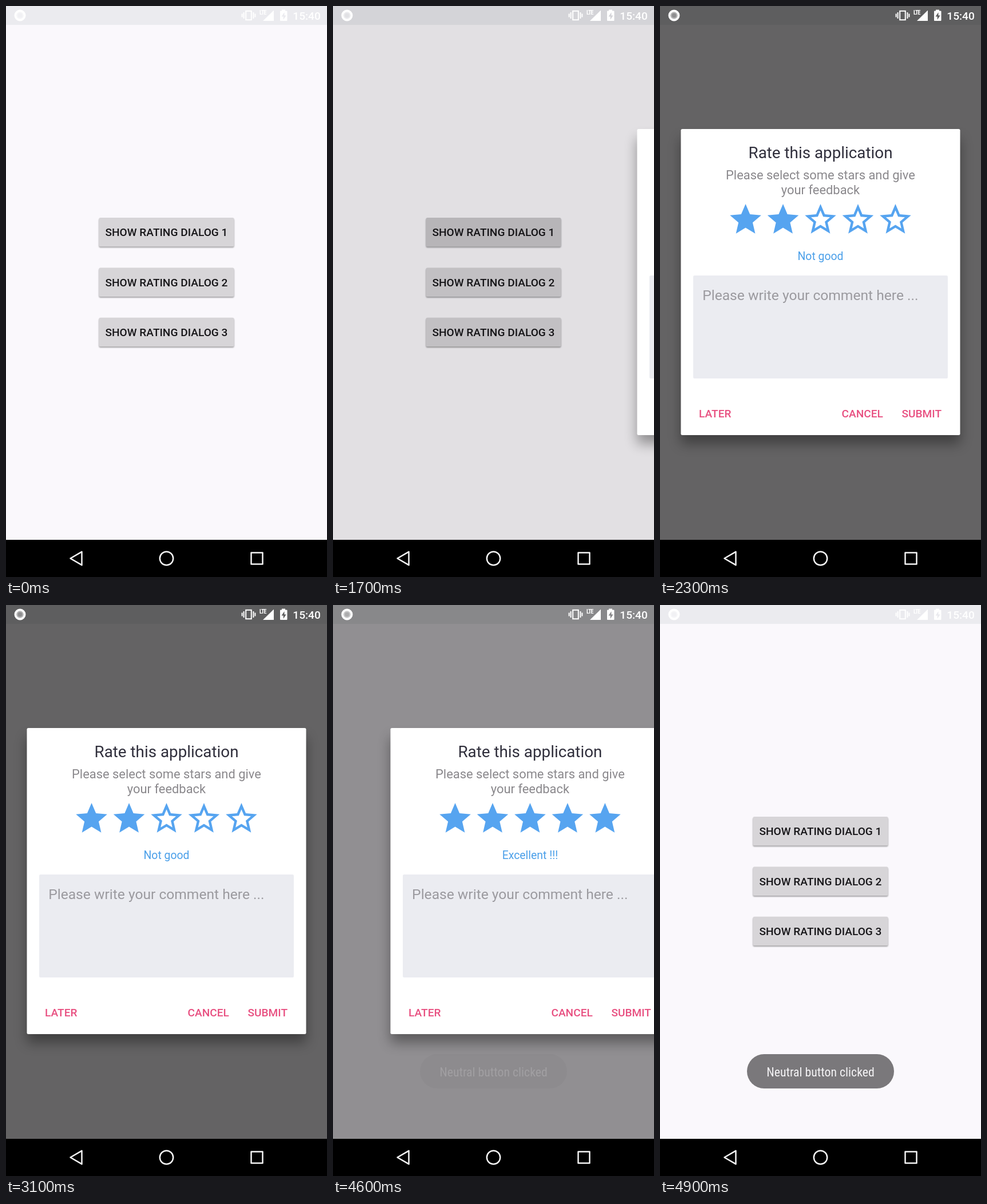
An HTML page that plays this animation: 561 by 998 pixels, repeating every 5 s.

```html
<!DOCTYPE html>
<html lang="en">
<head>
<meta charset="utf-8">
<title>Rating dialog</title>
<style>
  html, body { margin: 0; width: 100%; height: 100%; overflow: hidden; background: #faf8fc; }
  svg { display: block; width: 561px; height: 998px; }
  text { font-family: Roboto, "Open Sans", sans-serif; }
  .mid { text-anchor: middle; }
  .caps { font-size: 19.1px; font-weight: 500; }
  .soft { filter: blur(1.3px); }
  .deep { filter: blur(11px); }
  .condensed { font-family: "Roboto Condensed", Roboto, sans-serif; font-stretch: 75%; }
</style>
</head>
<body>
<svg viewBox="0 0 561 998" xmlns="http://www.w3.org/2000/svg">
  <defs>
    <path id="full" d="M12 17.27 18.18 21l-1.64-7.03L22 9.24l-7.19-.61L12 2 9.19 8.63 2 9.24l5.46 4.73L5.82 21z"/>
    <path id="empty" fill-rule="evenodd" d="M22 9.24l-7.19-.62L12 2 9.19 8.63 2 9.24l5.46 4.73L5.82 21 12 17.27 18.18 21l-1.63-7.03zM12 15.4l-3.76 2.27 1-4.28-3.32-2.88 4.38-.38L12 6.1l1.71 4.04 4.38.38-3.32 2.88 1 4.28z"/>
  </defs>

  <rect width="561" height="998" fill="#faf8fc"/>
  <rect width="561" height="33" fill="#ebebef"/>
  <g id="buttons"></g>
  <rect id="dim" width="561" height="933"/>

  <g id="toast">
    <rect x="152" y="785" width="257" height="60" rx="30" fill="#7a787b"/>
    <text class="mid condensed" x="280.5" y="823.5" font-size="21.8" fill="#f4f3f5">Neutral button clicked</text>
  </g>

  <g id="dialog">
    <rect class="deep" x="36.5" y="232" width="488" height="533" opacity=".36"/>
    <rect x="36.5" y="215" width="488" height="535" rx="2.5" fill="#fff"/>
    <text class="mid" x="280.5" y="266" font-size="27.8" fill="#302f3c">Rate this application</text>
    <g class="mid" font-size="21.9" fill="#8a888c">
      <text x="280.5" y="303.4">Please select some stars and give</text>
      <text x="280.5" y="329">your feedback</text>
    </g>
    <g id="stars" fill="#56a4f0"></g>
    <text id="note" class="mid" x="280.5" y="443.6" font-size="19.4" fill="#4a9fe9"></text>
    <rect x="58" y="471" width="445" height="180" rx="2.5" fill="#ebecf1"/>
    <text x="74.2" y="514" font-size="24.6" fill="#9b9a9f">Please write your comment here ...</text>
    <rect id="caret" x="74" y="488" width="1.4" height="33" fill="#77767b"/>
    <g class="caps" fill="#e84f80">
      <text x="68" y="719.3">LATER</text>
      <text x="317.5" y="719.3">CANCEL</text>
      <text x="422.5" y="719.3">SUBMIT</text>
    </g>
  </g>

  <g fill="#fff">
    <circle cx="24.5" cy="16.5" r="5.5" opacity=".3"/>
    <circle cx="24.5" cy="16.5" r="5" fill="none" stroke="#fff" stroke-width="2" opacity=".4"/>
    <circle cx="24.5" cy="16.5" r="8" fill="none" stroke="#fff" stroke-width="4"/>
    <path d="M419.2 8.8h9.6v15.4h-9.6zM415.6 11v11M412.6 13.5v6M432.4 11v11M435.4 13.5v6" fill="none" stroke="#fff" stroke-width="2"/>
    <text class="condensed" x="443" y="15.2" font-size="10" font-weight="700" letter-spacing="-.8">LTE</text>
    <path d="M468 7.5V26h-19z"/>
    <path fill-rule="evenodd" d="M482 6.5h6v2h2.5q1 0 1 1V25q0 1-1 1h-10.500q-1 0-1-1V9.500q0-1 1-1h2zM486.500 11l-5 7.500h3.200v5.500l5-7.500h-3.200z"/>
    <text class="caps" x="501.300" y="23.800">15:40</text>
  </g>

  <rect y="933" width="561" height="65"/>
  <g fill="none" stroke="#f4f4f4" stroke-width="2.500" stroke-linejoin="round">
    <path d="M112.500 965.500 132.500 953.800v23.400z"/>
    <circle cx="280.500" cy="965.500" r="11.700"/>
    <path d="M428.500 955.500h20v20h-20z"/>
  </g>
</svg>
<script>
const LOOP = 5000, STEP = 100, WIDTH = 561;
const $ = id => document.getElementById(id);

$('buttons').innerHTML = [1, 2, 3].map(n => {
  const y = 370 + (n - 1) * 87.4;
  const box = `x="162.5" width="236" height="50.5" rx="2.5"`;
  return `<rect class="soft" ${box} y="${y + 1.8}" opacity=".36"/>
    <rect ${box} y="${y}" fill="#d7d5d8"/>
    ${n === 1 ? `<rect id="press" ${box} y="${y}"/>` : ''}
    <text class="caps mid" x="280.5" y="${y + 32.3}" fill="#161518">SHOW RATING DIALOG ${n}</text>`;
}).join('');

const cell = 65.47;
$('stars').innerHTML = [0, 1, 2, 3, 4].map(i =>
  `<use transform="translate(${280.5 + (i - 2.5) * cell} 340.5) scale(${cell / 24})"/>`).join('');
const stars = [...$('stars').children];

// Each track is a list of [time, value, easing into it]
const line = p => p;
const wave = p => (1 - Math.cos(Math.PI * p)) / 2;
const tracks = {
  slide: [[1626, WIDTH], [1958, 0, wave], [4527, 0], [4860, WIDTH, wave]],
  dim: [[1640, 0], [2003, .6], [4490, .6], [4860, 0]],
  press: [[1390, 0], [1600, .055], [1800, .055], [2000, 0]],
  toast: [[4570, 0], [4600, .16], [4700, .52], [4800, .85], [4900, 1]]
};

function at(track, t) {
  const i = track.findIndex(k => k[0] > t);
  if (i === 0) return track[0][1];
  if (i < 0) return track[track.length - 1][1];
  const [t0, a] = track[i - 1], [t1, b, ease = line] = track[i];
  return a + (b - a) * ease((t - t0) / (t1 - t0));
}

function draw(t) {
  const slide = at(tracks.slide, t);
  const rated = t >= 3300;
  const caretOn = t < 4500 && (t - 1600) % 1000 < 500;
  $('dialog').setAttribute('transform', `translate(${slide} 0)`);
  $('dialog').style.display = slide < WIDTH ? '' : 'none';
  $('dim').style.opacity = at(tracks.dim, t);
  $('press').style.opacity = at(tracks.press, t);
  $('toast').style.opacity = at(tracks.toast, t);
  $('caret').style.opacity = caretOn ? 1 : 0;
  $('note').textContent = rated ? 'Excellent !!!' : 'Not good';
  stars.forEach((s, i) => s.setAttribute('href', i < (rated ? 5 : 2) ? '#full' : '#empty'));
}

const start = performance.now();
function tick() {
  const t = (performance.now() - start) % LOOP;
  draw(Math.floor(t / STEP) * STEP);
  requestAnimationFrame(tick);
}
tick();
</script>
</body>
</html>
```
